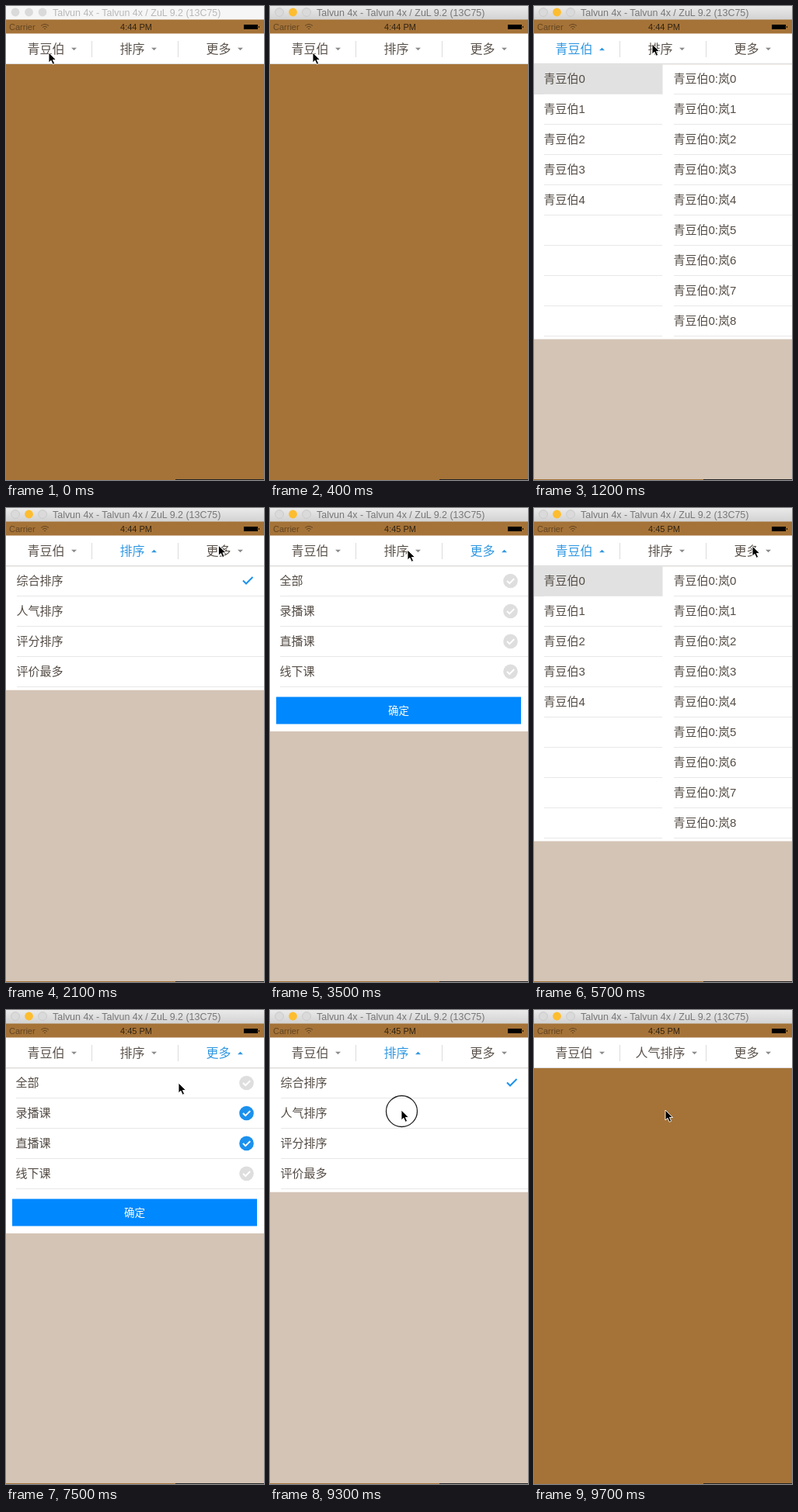
Write an HTML page that moves like this. It is 332 by 611 pixels and loops after 10000 ms.

```html
<!DOCTYPE html>
<html lang="zh">
<head>
<meta charset="utf-8">
<style>
  html, body { margin: 0; height: 100%; overflow: hidden; background: #a57338; }
  svg { display: block; width: 100vw; height: 100vh; }
  text { font-family: "Liberation Sans", "Noto Sans CJK SC", "Noto Sans CJK", sans-serif; fill: #544c45; }
  .row { font-size: 15px; }
  .tab { font-size: 16px; text-anchor: middle; }
  .status { font-size: 11px; fill: #000; }
</style>
</head>
<body>
<svg viewBox="0 0 332 611" preserveAspectRatio="none">
  <defs>
    <linearGradient id="bar" x2="0" y2="1">
      <stop stop-color="#eaeaea"/><stop offset="1" stop-color="#d2d2d2"/>
    </linearGradient>
    <clipPath id="clip"><rect id="panel" y="75.3" width="332" height="0"/></clipPath>
  </defs>
  <rect width="332" height="611" fill="#a57338"/>
  <rect id="shade" y="75" width="332" height="535" fill="#d4c4b5"/>
  <rect x="218" y="610" width="114" height="1" fill="#222"/>

  <rect id="titleBar" width="332" height="17.5"/>
  <g id="lights"></g>
  <text id="title" x="60" y="12.5" font-size="12.45">Talvun 4x - Talvun 4x / ZuL 9.2 (13C75)</text>

  <g opacity=".4">
    <text class="status" x="4" y="31">Carrier</text>
    <path d="M45 25.5q5-4 10 0M47 27.5q3-2.5 6 0M49 29.5h2" fill="none" stroke="#000"/>
  </g>
  <text id="clock" class="status" x="167.5" y="31" text-anchor="middle" opacity=".7"></text>
  <path d="M306 24h18v6h-18zM325 26h1v2h-1z"/>

  <rect y="35.5" width="332" height="39" fill="#fff"/>
  <path d="M0 74.5H332M110.5 45V66M221.5 45V66" stroke="#dcdcdc"/>
  <g id="tabs"></g>
  <g clip-path="url(#clip)">
    <rect y="75" width="332" height="355" fill="#fff"/>
    <g id="menus"></g>
  </g>
  <circle id="ring" r="20" fill="none" stroke="#222" stroke-width="1.3"/>
  <path id="cursor" d="M0 0V13L3 10.3L5.2 15.3L7.6 14.2L5.4 9.5H9.5Z" stroke="#fff" stroke-width=".9"/>
</svg>
<script>
const $ = id => document.getElementById(id);
const set = (id, attrs) => { for (const k in attrs) $(id).setAttribute(k, attrs[k]); };
const list = (n, f) => Array.from({ length: n }, (_, i) => f(i)).join('');

const BRAND = '青豆伯', BLUE = '#1b91ee', TAB_BLUE = '#3098e2';
const POINT = 332 / 375, ROW = 44 * POINT;
const heights = [0, 400, 180, 240].map(h => h * POINT);
const tabX = i => 51.5 + 111 * i;

// What the pointer does; a step without menu or check only passes by
const steps = [
  { at: 700, x: 55, y: 60, menu: 1, hold: 200 },
  { at: 1300, x: 152, y: 49 },
  { at: 1750, x: 164, y: 54, menu: 2 },
  { at: 2450, x: 277, y: 48, menu: 3, hold: 150 },
  { at: 3650, x: 177, y: 54, menu: 2 },
  { at: 4400, x: 76, y: 55, menu: 1 },
  { at: 5800, x: 281, y: 49, menu: 3 },
  { at: 6500, x: 228, y: 132, check: 1 },
  { at: 7000, x: 224, y: 172, check: 2 },
  { at: 7600, x: 222, y: 94 },
  { at: 8080, x: 166, y: 55, menu: 2 },
  { at: 9400, x: 169, y: 129, menu: 0, hold: 200 }
];

const text = (x, row, s) => `<text class="row" x="${x}" y="${99 + row * ROW}">${s}</text>`;
const texts = (x, names) => names.map((s, i) => text(x, i, s)).join('');
const lines = (x, end) => list(9, i =>
  `<rect x="${x}" y="${Math.round(113.3 + i * ROW)}" width="${end - x}" height="1" fill="#e8e8e8"/>`);
const tick = (d, color) => `<path d="${d}" fill="none" stroke="${color}" stroke-width="2"/>`;

const menus = [
  '<rect y="75" width="165.5" height="39" fill="#e1e1e1"/>' + lines(13, 165) + lines(180, 332) +
    list(5, i => text(12.5, i, BRAND + i)) + list(9, i => text(179.5, i, `${BRAND}0:岚${i}`)),

  lines(14, 332) + texts(13.5, ['综合排序', '人气排序', '评分排序', '评价最多']) +
    tick('M305 93.5l4 4 8.500-8.500', BLUE),

  lines(13, 332) + texts(12.5, ['全部', '录播课', '直播课', '线下课']) +
    list(4, i => `<g transform="translate(309.5 ${94 + i * ROW})">
      <circle id="check${i}" r="9.3"/>${tick('M-4.5 0l3.2 3.2 6-6', '#fff')}</g>`) +
    `<rect y="232" width="332" height="200" fill="#fff"/>
     <rect x="8" y="243.5" width="315" height="35" fill="#08f"/>
     <text x="165.5" y="266" font-size="13.5" text-anchor="middle" style="fill:#fff">确定</text>`
];

$('menus').innerHTML = list(3, i => `<g id="menu${i + 1}">${menus[i]}</g>`);
$('tabs').innerHTML = list(3, i =>
  `<text class="tab" id="tab${i}" x="${tabX(i)}" y="61"></text><path id="arrow${i}" d="M-3.5-1.7h7l-3.5 3.5z"/>`);
$('lights').innerHTML = list(3, i => `<circle id="light${i}" cx="${12 + 17.5 * i}" cy="8" r="5.4"/>`);

const ease = p => p < .5 ? 2 * p * p : 1 - 2 * (1 - p) ** 2;
const mix = (a, b, p) => a + (b - a) * p;

// Each move takes up to 400 ms and ends 150 ms before the press
function pointer(t) {
  let { x, y } = steps[0];
  for (const s of steps.slice(1)) {
    const arrive = s.at - (s.hold || 0) - 150;
    const p = ease(Math.min(1, Math.max(0, (t - arrive + 400) / 400)));
    x = mix(x, s.x, p);
    y = mix(y, s.y, p);
  }
  return [x, y];
}

function draw(t) {
  let from = 0, open = 0, since = 0, pressed = false;
  const checked = new Set();
  for (const { at, menu, check, hold } of steps) {
    pressed ||= hold && t >= at - hold && t < at;
    if (t < at) continue;
    if (menu !== undefined) [from, open, since] = [open, menu, at];
    if (check) checked.add(check);
  }

  const p = ease(Math.min(1, (t - since) / 250));
  set('panel', { height: mix(heights[from], heights[open], p) });
  set('shade', { opacity: open ? 1 : from ? 1 - p : 0 });
  for (let i = 1; i < 4; i++) $('menu' + i).style.display = i === (open || from) ? '' : 'none';
  for (let i = 0; i < 4; i++) set('check' + i, { fill: checked.has(i) ? BLUE : '#dedede' });

  [BRAND, t >= 9400 ? '人气排序' : '排序', '更多'].forEach((s, i) => {
    const on = open === i + 1, tab = $('tab' + i);
    tab.textContent = s;
    tab.style.fill = on ? TAB_BLUE : '#5b534c';
    set('arrow' + i, {
      fill: on ? TAB_BLUE : '#8c8c8c',
      transform: `translate(${tabX(i) + s.length * 8 + 12} 55.5) scale(1 ${on ? -1 : 1})`
    });
  });

  const active = t >= 300;
  set('titleBar', { fill: active ? 'url(#bar)' : '#f6f6f6' });
  $('title').style.fill = active ? '#777' : '#b8b8b8';
  for (let i = 0; i < 3; i++) {
    const yellow = active && i === 1;
    set('light' + i, { fill: yellow ? '#fdbd2f' : '#dadada', stroke: active && !yellow ? '#cacaca' : 'none' });
  }
  $('clock').textContent = t < 3000 ? '4:44 PM' : '4:45 PM';

  const [x, y] = pointer(t);
  set('cursor', { transform: `translate(${x} ${y})` });
  set('ring', { cx: x + .5, cy: y + 1.5 });
  $('ring').style.display = pressed ? '' : 'none';
}

const start = performance.now();
function loop() {
  draw(Math.floor((performance.now() - start) % 10000 / 100) * 100);
  requestAnimationFrame(loop);
}
loop();
</script>
</body>
</html>
```
